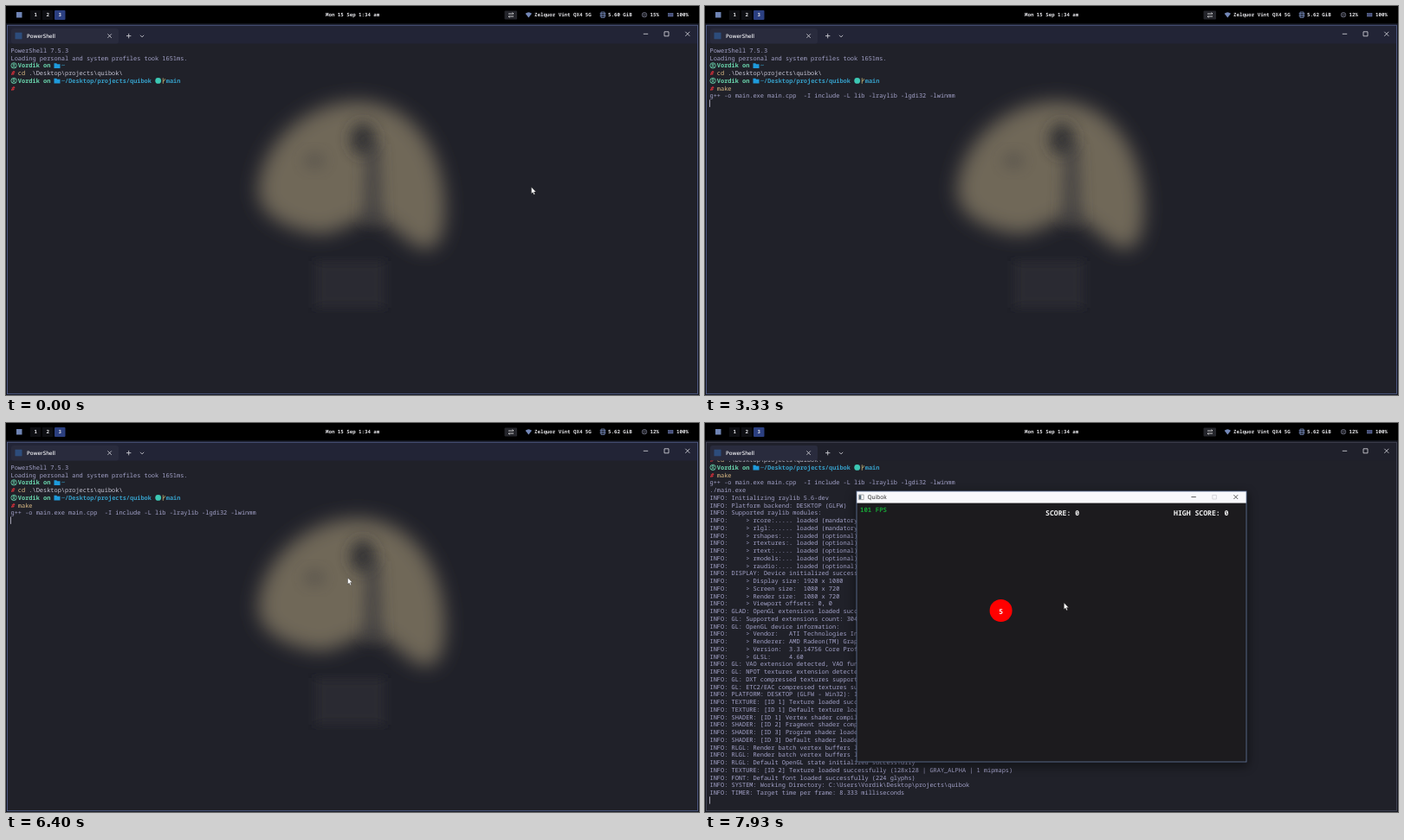
Recreate the animation shown at these times as an HTML page. Size 800 by 450 pixels, loop 8000 ms.

```html
<!DOCTYPE html>
<html lang="en">
<head>
<meta charset="utf-8">
<title>Terminal build</title>
<style>
html, body { margin: 0; width: 100%; height: 100%; overflow: hidden; background: #000; }
svg { display: block; width: 100vw; height: 100vh; }
text { text-rendering: geometricPrecision; font-variant-ligatures: none; }
.term { font: 500 6.95px "Noto Sans Mono", "DejaVu Sans Mono", monospace; fill: #a5a4cb; }
.bar { font: 700 5.78px "Noto Sans Mono", "DejaVu Sans Mono", monospace; fill: #e4e4e8; }
.ui { font: 600 6.2px "Open Sans", "Noto Sans", sans-serif; fill: #f0f0f4; }
.game { font: 600 8.15px "Noto Sans Mono", "DejaVu Sans Mono", monospace; fill: #f5f5f5; }
.line { fill: none; stroke-width: .8; }
</style>
</head>
<body>
<svg id="stage" viewBox="0 0 800 450" preserveAspectRatio="none">
  <defs>
    <filter id="soft" x="-30%" y="-30%" width="160%" height="160%"><feGaussianBlur stdDeviation="11"/></filter>
    <filter id="mid" x="-100%" y="-60%" width="300%" height="220%"><feGaussianBlur stdDeviation="8"/></filter>
    <filter id="shade" x="-10%" y="-10%" width="120%" height="120%"><feGaussianBlur stdDeviation="6"/></filter>
    <clipPath id="body"><path d="M2 43.5H798V448H2z"/></clipPath>
  </defs>
  <rect width="800" height="450"/>
  <path fill="#11131b" d="M0 20H800V450H0z"/>
  <rect x="1.5" y="22.2" width="797" height="426.5" fill="#202129"/>
  <g id="wallpaper">
    <path filter="url(#soft)" fill="#706859" d="M291 214C293 160 345 111 405 110C460 110 495 152 504 205C511 248 504 284 483 281C462 277 448 250 424 246C400 243 385 268 355 263C316 256 291 238 291 214z"/>
    <ellipse filter="url(#mid)" cx="412" cy="154" rx="15" ry="19" fill="#2f2f33" opacity=".85"/>
    <path filter="url(#mid)" fill="#36343a" opacity=".6" d="M414 160H432L436 250H411z"/>
    <ellipse filter="url(#mid)" cx="356" cy="179" rx="13" ry="10" fill="#36343a" opacity=".28"/>
    <rect filter="url(#shade)" x="357" y="295" width="80" height="54" fill="#292a31"/>
  </g>
  <rect id="header" x="2" y="22.5" width="796" height="21" fill="#222436"/>
  <rect x="6" y="26" width="124" height="17.5" rx="3" fill="#292b3d"/>
  <rect x="10.5" y="30.7" width="8" height="7.6" fill="#2d4c7c"/>
  <text class="ui" x="24" y="37">PowerShell</text>
  <path class="line" stroke="#dcdce2" d="M117.4 32.4l4.4 4.4m0-4.4l-4.4 4.4M139 34.6h5.4m-2.7-2.7v5.4M155 33.8l2.1 2.1 2.1-2.1M735.8 32.3h5.4M760 29.8h5v5h-5zM784.3 29.8l5 5m0-5l-5 5"/>
  <rect id="frame" class="line" x="1.5" y="22.2" width="797" height="426.5" stroke="#5b6899"/>

  <g id="topbar">
    <rect x="12" y="7" width="6.5" height="6.5" fill="#6f84b4"/>
    <path fill="#0e0f13" d="M28 5h12v11H28zM42 5h12v11H42z"/>
    <rect x="56" y="5" width="12.5" height="11" rx="1" fill="#2b3f80"/>
    <text class="bar" x="32.5" y="12.2">1</text><text class="bar" x="46.5" y="12.2">2</text><text class="bar" x="60.5" y="12.2">3</text>
    <text class="bar" x="369" y="12.2">Mon 15 Sep 1:34 am</text>
    <rect x="575.5" y="5.5" width="14.5" height="10" rx="1" fill="#24252b"/>
    <path class="line" stroke="#eee" d="M580 9h6l-1.4-1.4M586 12h-6l1.4 1.4"/>
    <path fill="#7488b8" d="M599.6 8.8q3.7-3 7.4 0l-3.7 4.6z"/>
    <text class="bar" x="610" y="12.2">Zelquor Vint QX4 5G</text>
    <path class="line" stroke="#7488b8" d="M687 7h4v6.4h-4zM685.6 8.6h6.8M685.6 10.2h6.8M685.6 11.8h6.8"/>
    <text class="bar" id="memory" x="695" y="12.2"></text>
    <g class="line" stroke="#6c6f82"><circle cx="737" cy="10.2" r="2.8"/><path d="M734.6 9.2h4.8M734.6 11.2h4.8"/></g>
    <text class="bar" id="cpu" x="743.5" y="12.2"></text>
    <rect x="764.6" y="8.4" width="5.4" height="3.6" fill="#454c78" stroke="#7488b8" stroke-width=".5"/>
    <text class="bar" x="774" y="12.2">100%</text>
  </g>

  <g clip-path="url(#body)"><g id="rows"></g><rect id="caret" width=".8" height="8.4" fill="#c9c6d8"/></g>

  <g id="window">
    <rect id="shadow" filter="url(#shade)" x="-2" y="2" width="454" height="316" opacity=".45"/>
    <rect id="content" y="13" width="450" height="300"/>
    <rect id="title" width="450" height="13.6" fill="#f8f8fb"/>
    <path fill="#fff" stroke="#777" stroke-width=".6" d="M2.5 4h5.6v5.6H2.5z"/><path fill="#5a6d7c" d="M3 4.4h2.4v4.8H3z"/>
    <text class="ui" id="caption" x="12.4" y="9.2" style="font-weight:400;font-size:6.6px">Quibok</text>
    <path id="buttons" class="line" d="M386.4 6.6h5.4M435.4 4.2l4.8 4.8m0-4.8l-4.8 4.8"/>
    <path class="line" stroke="#cfcfd4" d="M410.8 4.4h4.6v4.6h-4.6z"/>
    <rect id="edge" class="line" width="450" height="313"/>
    <g id="play">
      <text class="game" x="4" y="24" style="font-size:7.4px;fill:#17a035">101 FPS</text>
      <text class="game" x="218" y="28">SCORE: 0</text>
      <text class="game" x="366" y="28">HIGH SCORE: 0</text>
      <circle cx="166.6" cy="138" r="13" fill="#f00"/>
      <text class="game" x="166.6" y="142.4" text-anchor="middle">5</text>
    </g>
  </g>
  <g id="busy"><circle r="3.2" fill="#e8f4fc" stroke="#1c84cc" stroke-width="1.7"/><path class="line" stroke="#8cc8f0" d="M0-3.2A3.2 3.2 0 0 1 3.2 0"/></g>
  <path id="pointer" fill="#fff" stroke="#222" stroke-width=".35" d="M0 0v7.6l1.7-1.5 1.2 2.6 1.2-.5-1.1-2.6 2.3-.2z"/>
</svg>
<script>
const LOOP = 8000, X0 = 5.5, COL = 4.17, ROW = 8.75, BASE = 53.8;
const START = performance.now();
const $ = id => document.getElementById(id);
const put = (el, attrs) => { for (const k in attrs) el.setAttribute(k, attrs[k]); return el; };
const show = (el, on) => put(el, { visibility: on ? 'visible' : 'hidden' });
const move = (el, x, y) => put(el, { transform: `translate(${x} ${y})` });
const make = (tag, attrs, parent) =>
  parent.appendChild(put(document.createElementNS('http://www.w3.org/2000/svg', tag), attrs));
const write = (el, s) => { el.textContent = s.replace(/ /g, '\u00a0'); };

const USER = 'Vordik', GREEN = '#6bd9b0', BLUE = '#369fc8', RED = '#e0323c', TAN = '#dfbd86';
const ok = ' loaded successfully';
const info = s => 'INFO: ' + s;
const item = s => info('    > ' + s);
const modules = ['rcore:.....', 'rlgl:......', 'rshapes:...', 'rtextures:.', 'rtext:.....', 'rmodels:...', 'raudio:....']
  .map((m, i) => item(`${m} loaded (${i < 2 ? 'mandatory' : 'optional'})`));
const device = [
  'DISPLAY: Device initialized successfully', '>Display size: 1920 x 1080', '>Screen size:  1080 x 720',
  '>Render size:  1080 x 720', '>Viewport offsets: 0, 0', 'GLAD: OpenGL extensions' + ok,
  'GL: Supported extensions count: 304', 'GL: OpenGL device information:', '>Vendor:   ATI Technologies Inc.',
  '>Renderer: AMD Radeon(TM) Graphics', '>Version:  3.3.14756 Core Profile Context', '>GLSL:     4.60',
  'GL: VAO extension detected, VAO functions' + ok, 'GL: NPOT textures extension detected, full NPOT textures supported',
  'GL: DXT compressed textures supported', 'GL: ETC2/EAC compressed textures supported',
  'PLATFORM: DESKTOP (GLFW - Win32): Initialized successfully',
  'TEXTURE: [ID 1] Texture' + ok + ' (1x1 | R8G8B8A8 | 1 mipmaps)', 'TEXTURE: [ID 1] Default texture' + ok,
  'SHADER: [ID 1] Vertex shader compiled successfully', 'SHADER: [ID 2] Fragment shader compiled successfully',
  'SHADER: [ID 3] Program shader' + ok, 'SHADER: [ID 3] Default shader' + ok,
  'RLGL: Render batch vertex buffers' + ok + ' in RAM (CPU)', 'RLGL: Render batch vertex buffers' + ok + ' in VRAM (GPU)',
  'RLGL: Default OpenGL state initialized successfully',
  'TEXTURE: [ID 2] Texture' + ok + ' (128x128 | GRAY_ALPHA | 1 mipmaps)', 'FONT: Default font' + ok + ' (224 glyphs)',
  `SYSTEM: Working Directory: C:\\Users\\${USER}\\Desktop\\projects\\quibok`, 'TIMER: Target time per frame: 8.333 milliseconds'
].map(s => s[0] === '>' ? item(s.slice(1)) : info(s));
const lines = ['PowerShell 7.5.3', 'Loading personal and system profiles took 1651ms.', '', '', '', '',
  'g++ -o main.exe main.cpp  -I include -L lib -lraylib -lgdi32 -lwinmm', './main.exe',
  info('Initializing raylib 5.6-dev'), info('Platform backend: DESKTOP (GLFW)'), info('Supported raylib modules:'),
  ...modules, ...device];

const rows = lines.map((s, i) => {
  const g = move(make('g', {}, $('rows')), X0, BASE + i * ROW);
  if (s) write(make('text', { class: 'term' }, g), s);
  return g;
});
function span(row, col, s, fill, style = '') {
  const el = make('text', { class: 'term', x: col * COL, style: `fill:${fill};${style}` }, rows[row]);
  write(el, s);
  return el;
}
function prompt(row, path) {
  const bold = 'font-weight:700', g = rows[row];
  make('circle', { class: 'line', cx: 3.6, cy: -2.4, r: 3.2, stroke: GREEN }, g);
  make('circle', { class: 'line', cx: 3.6, cy: -3.4, r: 1.1, stroke: GREEN }, g);
  make('path', { class: 'line', stroke: GREEN, d: 'M1.6-.2q2-2.4 4 0' }, g);
  span(row, 2, USER + ' on', GREEN, bold);
  make('path', { fill: '#1e9bdc', d: 'M50-5h2.8l.8 1H57V.6h-7z' }, g);
  span(row, 14, path, BLUE, bold);
}
prompt(2, '~');
prompt(4, '~/Desktop/projects/quibok');
make('circle', { cx: 170.2, cy: -2.4, r: 3.4, fill: '#3cc8b4' }, rows[4]);
make('path', { class: 'line', stroke: '#c8b878', d: 'M175.8 1v-6.5M175.8-1.6q2.2-.6 2.2-3' }, rows[4]);
span(4, 43, 'main', BLUE, 'font-weight:700');
[3, 5].forEach(r => span(r, 0, '#', RED, 'font-weight:700;font-style:italic'));
span(3, 2, 'cd', TAN);
span(3, 5, '.\\Desktop\\projects\\quibok\\', '#c9c8d8');
const typed = span(5, 2, '', TAN);
const hint = span(5, 7, 'win', '#6d6c78', 'font-style:italic');
const partial = rows[42].firstChild, partialText = lines[42];

const ENTER = 3000, OPEN = 7260, CENTER = 7325, DONE = 7395, PLAY = 7595;
const keyTimes = [1860, 1990, 2060, 2190];
// [time, visible rows]
const output = [[0, 6], [ENTER, 7], [7190, 8], [OPEN, 18], [CENTER, 43], [DONE, 48]];
// [time, x, y] of the pointer tip
const track = [[0, 606.5, 209.5], [3900, 606.5, 209.5], [4250, 625.4, 180.3], [5350, 625.4, 180.3],
  [6300, 394.5, 179], [7395, 394.5, 179], [7860, 414.4, 208]];

function pointerAt(t) {
  const i = track.findIndex(k => k[0] > t);
  if (i < 0) return track[track.length - 1].slice(1);
  const a = track[i - 1], b = track[i], u = (t - a[0]) / (b[0] - a[0]), e = u * u * (3 - 2 * u);
  return [a[1] + (b[1] - a[1]) * e, a[2] + (b[2] - a[2]) * e];
}

function render(t) {
  const keys = keyTimes.filter(k => k <= t).length;
  const count = output.filter(o => o[0] <= t).pop()[1];
  const opened = t >= OPEN, centered = t >= CENTER, playing = t >= PLAY;
  const printing = centered && t < DONE, scroll = t >= DONE ? 4 : 0;

  write($('memory'), t < ENTER ? '5.60 GiB' : '5.62 GiB');
  write($('cpu'), t < ENTER ? '15%' : '12%');
  typed.textContent = 'make'.slice(0, keys);
  show(hint, keys === 4 && t < ENTER);
  rows.forEach((r, i) => put(r, { display: i < count ? 'inline' : 'none' }));
  write(partial, printing ? partialText.slice(0, 22) : partialText);
  move($('rows'), 0, -scroll * ROW);

  const [row, col] = t < ENTER ? [5, 2 + keys] : printing ? [42, 22] : [count, 0];
  const phase = t < keyTimes[0] ? 530 : 0;
  put($('caret'), { x: X0 + col * COL - .3, y: BASE - 6.6 + (row - scroll) * ROW });
  show($('caret'), printing || (t >= keyTimes[0] && t < 2400) || (t + phase) % 1060 < 530);

  put($('header'), { fill: opened ? '#1f202b' : '#222436' });
  put($('frame'), { stroke: opened ? '#4b4e60' : '#5b6899' });
  put($('window'), { display: opened ? 'inline' : 'none' });
  move($('window'), centered ? 175 : 41.2, playing ? 79 : centered ? 62 : 40.2);
  put($('shadow'), { display: centered ? 'inline' : 'none' });
  put($('content'), { fill: playing ? '#1c1b1e' : centered ? '#fdfdfe' : 'none' });
  put($('title'), { fill: centered ? '#f8f8fb' : '#e6e6e8' });
  $('caption').style.fill = centered ? '#222' : '#8a8a90';
  put($('buttons'), { stroke: centered ? '#333' : '#88888e' });
  put($('edge'), { stroke: playing ? '#64789f' : centered ? '#b9bcc6' : '#86a8dc' });
  put($('play'), { display: playing ? 'inline' : 'none' });

  const [px, py] = pointerAt(t), waiting = centered && t < 7530;
  show($('pointer'), !waiting && (t < keyTimes[0] || t >= 3900));
  show($('busy'), waiting);
  move($('pointer'), px, py);
  move($('busy'), px - .4, py + .4);
}

function tick() {
  render((performance.now() - START) % LOOP);
  requestAnimationFrame(tick);
}
tick();
</script>
</body>
</html>
```
